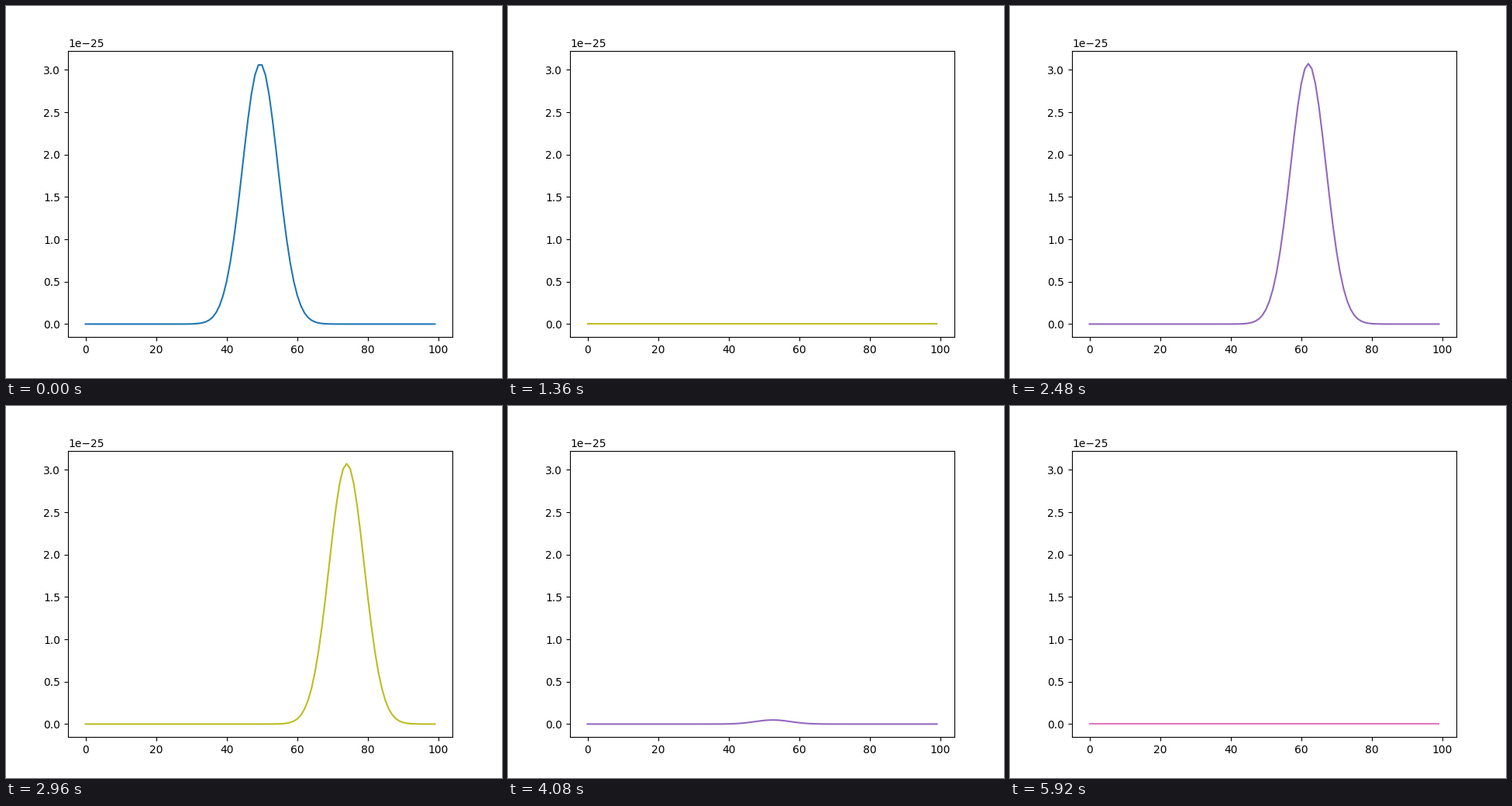
Recreate the animation shown at these times as a matplotlib script. Size 640 by 480 pixels, loop 5.94 s.

```python
import numpy as np
import matplotlib.pyplot as plt
from matplotlib.animation import FuncAnimation

STEPS = 99         # steps in each of the three runs
PEAK = 3.073e-25
SIGMA = 5
SPEED = 0.5        # cells per step
DECAY = 0.5        # amplitude factor per step

# (moves, decays) for each run: damping, advection, both
RUNS = [(False, True), (True, False), (True, True)]

x = np.arange(100)


def pulse(frame):
    run, step = divmod(frame, STEPS)
    moves, decays = RUNS[run]
    center = x.mean() + SPEED * step * moves
    height = PEAK * DECAY ** (step * decays)
    return height * np.exp(-((x - center) / SIGMA) ** 2 / 2)


fig, ax = plt.subplots(figsize=(6.4, 4.8), dpi=100)
line, = ax.plot(x, pulse(0))
ax.set_ylim(-0.05 * PEAK, 1.05 * PEAK)


def update(frame):
    line.set_ydata(pulse(frame))
    line.set_color(f"C{frame % 10}")
    return line,


anim = FuncAnimation(fig, update, frames=len(RUNS) * STEPS, interval=20,
                     repeat=True, repeat_delay=0)
plt.show()
```
